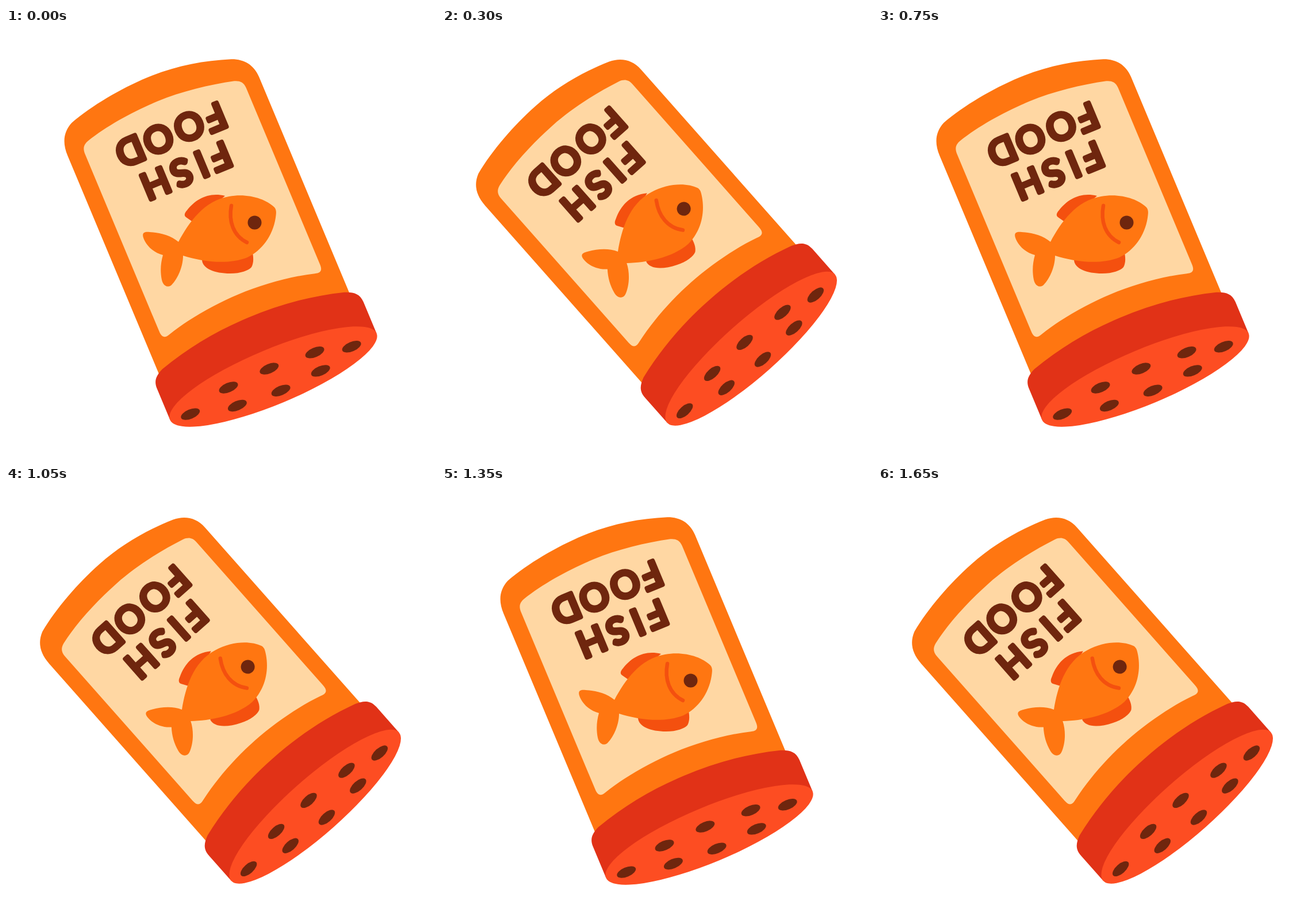
Write an HTML page that moves like this. It is 748 px wide and 748 px high and loops after 1.8 s.

```html
<!DOCTYPE html>
<html lang="en">
<head>
<meta charset="utf-8">
<title>Fish food</title>
<style>
  html, body { margin: 0; width: 100%; height: 100%; overflow: hidden; background: #fff; }
  svg { display: block; width: 100%; height: 100%; }
  .lettering {
    font: 400 63px Lato, "Open Sans", sans-serif;
    text-anchor: middle;
    fill: #6f260e;
    stroke: #6f260e;
    stroke-width: 7.6;
    stroke-linejoin: round;
  }
</style>
</head>
<body>
<svg viewBox="0 0 748 748">
  <g id="shaker">
    <g transform="translate(374 374) rotate(-22.7) translate(-7 0)">
      <!-- can and label -->
      <path fill="#ff7611" d="M-180.5 190V-243C-180.5-268-171-284-152-293C-108-307-52-315 0-315S100-305 147-288C167-280 179.5-264 179.5-241V190Z"/>
      <path fill="#ffd7a3" d="M-151.5-234C-151.5-245-147-250-138-253C-97-265-45-270 0-270S95-262 137-251C146-248 151.5-243 151.5-232V101C151.5 113 146 115 137 112C95 100 45 94 0 94S-95 100-137 112C-146 115-151.5 113-151.5 101Z"/>
      <!-- lid -->
      <path fill="#e13217" d="M-193.5 249.5V191C-193.5 175-185 169-172 163C-115 146-60 138 0 138S115 145 172 162C186 167 196 174 196 190V249.5Z"/>
      <ellipse cx="1.2" cy="249.5" rx="194.8" ry="48" fill="#fd4d22"/>
      <g id="holes" fill="#6f260e"></g>
      <g class="lettering" transform="rotate(180)">
        <text y="162" x="-64 -29 9 58">FISH</text>
        <text y="228" x="-82 -34 24 77" dy="0 3">FOOD</text>
      </g>
    </g>
    <!-- fish -->
    <g fill="#f4500f">
      <path d="M323 336L313 329C309 326 311 321 315 317C330 298 352 285 381 292C360 310 345 324 323 336Z"/>
      <path d="M341 404C342 418 362 427 390 427C408 427 422 422 427 416C431 409 431 398 428 388L380 390Z"/>
    </g>
    <path fill="#ff7611" d="M300 372C318 338 345 300 388 293C420 287 452 297 467 312C471 317 470 322 469 330C464 362 445 387 420 399C385 413 340 406 308 396C308 415 299 436 288 447C281 453 273 448 271 438C268 423 269 409 273 395C257 391 244 379 239 365C236 356 241 354 250 355C268 356 287 361 300 372Z"/>
    <path fill="none" stroke="#f4500f" stroke-width="6.5" stroke-linecap="round" d="M392 309C387 336 395 361 419 373"/>
    <circle cx="432.5" cy="338.5" r="12" fill="#6f260e"/>
  </g>
</svg>
<script>
  const NS = "http://www.w3.org/2000/svg";
  const shaker = document.getElementById("shaker");
  const holes = document.getElementById("holes");

  function add(parent, tag, attrs) {
    const el = document.createElementNS(NS, tag);
    for (const key in attrs) el.setAttribute(key, attrs[key]);
    return parent.appendChild(el);
  }

  [[-157, 254], [-78, 237], [0, 234], [84, 238.5], [147, 254], [-76, 272], [4, 277], [81, 272]]
    .forEach(([cx, cy]) => add(holes, "ellipse", { cx, cy, rx: 17.5, ry: 8.3 }));

  // Two held poses, 300 ms each
  const HOLD = 300;
  const POSES = ["", "translate(-97.9 133.5) rotate(-18.8)"];

  function draw(ms) {
    shaker.setAttribute("transform", POSES[Math.floor(ms / HOLD) % POSES.length]);
  }

  const start = performance.now();
  function tick() {
    draw(performance.now() - start);
    requestAnimationFrame(tick);
  }
  draw(0);
  requestAnimationFrame(tick);
</script>
</body>
</html>
```
